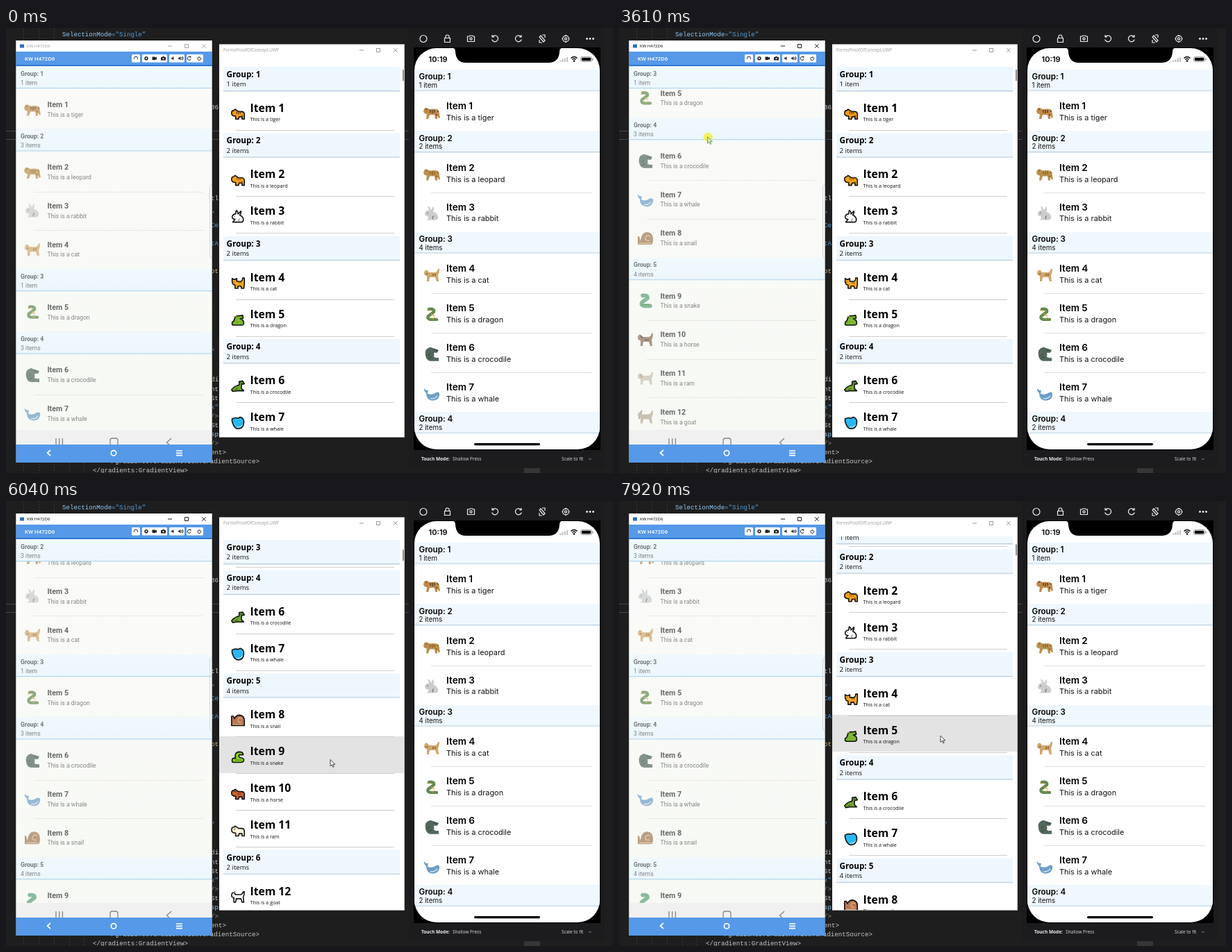
An HTML page that plays this animation: 874x641 px, repeating every 7.99 s.

```html
<!DOCTYPE html>
<html lang="en">
<head>
<meta charset="utf-8">
<title>Grouped lists on three platforms</title>
<style>
  html, body { margin: 0; width: 100%; height: 100%; overflow: hidden; background: #1e1e1e; }
  svg { display: block; width: 874px; height: 641px; }
  text { white-space: pre; }
  .sharp { shape-rendering: crispEdges; }
  .roboto { font-family: Roboto, sans-serif; }
  .open { font-family: "Open Sans", sans-serif; }
  .inter { font-family: Inter, sans-serif; }
  .mono { font-family: "Liberation Mono", monospace; }
</style>
</head>
<body>
<svg id="stage" viewBox="0 0 874 641"></svg>
<script>
const LOOP = 7990;
const DEVICE = 'KW H472D6';
const ANIMALS = ['tiger', 'leopard', 'rabbit', 'cat', 'dragon', 'crocodile', 'whale',
  'snail', 'snake', 'horse', 'ram', 'goat', 'sheep', 'camel', 'llama'];

// ---------- drawing helpers ----------
const rect = (x, y, w, h, fill, more = '') =>
  `<rect x="${x}" y="${y}" width="${w}" height="${h}" fill="${fill}" ${more}/>`;
const line = (d, color, width = 1, more = '') =>
  `<path d="${d}" fill="none" stroke="${color}" stroke-width="${width}" ${more}/>`;
const shape = (d, fill, more = '') => `<path d="${d}" fill="${fill}" ${more}/>`;
const at = (x, y, body, more = '') => `<g transform="translate(${x} ${y})" ${more}>${body}</g>`;
const text = (x, middle, words, size, fill, font, weight = 400) =>
  `<text class="${font}" x="${x}" y="${middle + size * 0.36}" font-size="${size}" fill="${fill}" font-weight="${weight}">${words}</text>`;
const escape = s => s.replace(/</g, '&lt;').replace(/>/g, '&gt;');

// ---------- animals ----------
const PROWLER = 'M-12-2Q-11-8-7-7L-3-5Q3-6 7-5Q11-4 11 2L12 7L10 8L8 4V9H5L4 3H-3L-5 9H-8L-7 2Q-11 2-12-2Z';
const TAIL_UP = 'M-11-3Q-10-9-6-7L-4-4H5Q8-5 9-9L11-9Q11-3 9 0L10 9H7L5 3H-3L-4 9H-7V1Q-11 1-11-3Z';
const CHUNKY = 'M-11-1Q-11-6-7-6L-5-8L-2-6L1-4H6Q11-4 11 1V9H7V5H2L1 9H-4V4Q-11 4-11-1Z';
const STRIPES = 'M-2-4V0M1-4V1M4-4V0M-8-6V-4M8-3L10-2M6 2L8 4';
const COIL = 'M-4-8Q4-9 3-4Q-1-1-5 2Q-7 6-2 7H7';
const FLEECE = 'M-8-5Q-4-6-5-2Q-8-1-7-3';
// soft path, soft colour, vivid path, vivid colour, detail path, detail colour, ribbon width
const ART = {
  tiger: [PROWLER, '#c18a48', CHUNKY, '#f99a1c', STRIPES, '#4b3626'],
  leopard: [PROWLER, '#b98f4c', CHUNKY, '#f8a01f', STRIPES, '#8a5c20'],
  rabbit: ['M-10 0Q-9-5-4-5L-6-11Q-2-10-1-5L2-11Q4-7 2-3Q10 0 9 6Q9 9 5 9H-8Q-4 7-5 4Q-10 4-10 0Z', '#cbcccc',
    'M-10 0Q-9-5-4-5L-3-11Q0-10 0-5L5-10Q6-7 3-3Q10 0 9 6Q9 9 5 9H-9L-5 4Q-10 4-10 0Z', '#fff', 'M-6-2V0M3 3Q0 5 2 8', '#777'],
  cat: [TAIL_UP, '#d0a76b', 'M-10-2V-8L-6-6L-2-8V-3H5Q8-4 8-9H11V2L10 9H6L5 5H0V9H-5V3Q-9 3-10-2Z', '#ffaa22', 'M-8-2H-6M2-2V1M5-2V1', '#7a4d22'],
  dragon: [COIL, '#64894f', 'M-10 8V4Q-6 2-6-2Q-4-8 2-7L8-8L9-3L4-2Q10 0 10 5Q10 9 6 9H-8Z', '#72b82c', 'M-7-6H-2M-1-1L4 2M1 7L4 4', '#c9a146', 4.4],
  crocodile: ['M-9 2Q-11-8-2-10L10-6L8-2L3-2Q4 1 3 4Q6 6 10 5V10H-2Q-8 9-9 2Z', '#53685d',
    'M-11 6Q-8 2-4 0Q0-2 2-2V-8L8-9L11-4L6-3V4L10 8H-2L-9 9Z', '#70a927', 'M2-6L8-5M-6 2L-2-1M-5 6L0 4', '#3c5043'],
  whale: ['M-11-8Q-9-4-5-5L-6 0Q0 3 7-2Q12-3 11 3Q9 10 1 10Q-8 9-8-1Q-12-4-11-8Z', '#6d9ec7',
    'M-10-7Q-5-10 0-8L4-10Q11-8 10 0Q9 10 0 10Q-6 9-8 3Q-11-3-10-7Z', '#28b8f0', 'M-2 7Q5 8 8 3', '#d6e6ef'],
  snail: ['M-11 9V-3H-9L-7 4Q-6-9 3-9Q11-8 11 1Q11 9 8 9Z', '#a17b59', 'M-11 9V-7H-8L-6-3Q-3-9 3-9Q11-8 11 1V9Z', '#b97755', 'M6 3Q-1 4 0-1Q2-6 7-3M-9 7H8', '#e2bb88'],
  snake: [COIL, '#5c9f77', 'M-10 8V4Q-9 1-4 2Q-7-8 2-9Q9-9 9-4H2Q0 0 5 1Q11 2 10 6Q9 9 5 9H-8Z', '#8bd321', 'M-5 5H6', '#3c7a34', 5.6],
  horse: [TAIL_UP, '#8c7058', CHUNKY, '#c9622e', 'M-7-5L-3-3M-1 0H5', '#4b3022'],
  ram: [TAIL_UP, '#c9c2b1', CHUNKY, '#fff4df', FLEECE, '#ad8b59'],
  goat: [TAIL_UP, '#b8ab95', TAIL_UP, '#fff', 'M-7-6L-5-10M-9 0V3', '#756858'],
  sheep: [TAIL_UP, '#cfcabc', CHUNKY, '#fff', FLEECE, '#aaa']
};
ART.camel = ART.horse;
ART.llama = ART.ram;

function animal(name, vivid) {
  const [softPath, soft, vividPath, bright, detail, detailColor, ribbon] = ART[name];
  const round = 'stroke-linejoin="round" stroke-linecap="round"';
  let body;
  if (vivid) body = shape(vividPath, bright, `stroke="#111" stroke-width="1.9" ${round}`);
  else if (ribbon) body = line(softPath, soft, ribbon, round);
  else body = shape(softPath, soft);
  return body + line(detail, detailColor, 1.3);
}

// ---------- grouped lists ----------
const PANELS = {
  android: {
    counts: [1, 3, 1, 3, 4, 2], top: 55, slot: 34.6, row: 55.7, font: 'roboto',
    header: { x: 14, w: 283, h: 31, fill: 'url(#paleHeader)', edge: '#b4d8ee', label: 10.5, sub: 24, textX: 21, sizes: [8.7, 8.7], colors: ['#70777b', '#7d8488'] },
    item: { title: 20.5, sub: 35, textX: 59.5, sizes: [10.7, 8.7], weight: 700, colors: ['#686a68', '#858784'], rule: [40, 284, 55.7, '#e6e8e3'], icon: [38, 28, 1], fade: 0.7 }
  },
  windows: {
    counts: [1, 2, 2, 2, 4, 2, 2], top: 56, slot: 42.4, row: 53, font: 'open', vivid: true,
    header: { x: 313, w: 254, h: 34, fill: '#eff7fe', edge: '#b3c9dc', label: 10.8, sub: 25, textX: 317.5, sizes: [11.7, 9.6], colors: ['#000', '#111'] },
    item: { title: 17, sub: 33.5, textX: 351.5, sizes: [15.7, 7.2], weight: 700, colors: ['#000', '#111'], rule: [331, 559, 48.4, '#cdcdcd'], icon: [334, 25.3, 0.84], fade: 1 }
  },
  phone: {
    counts: [1, 2, 4, 2], top: 60, slot: 31.6, row: 56.9, font: 'inter',
    header: { x: 588, w: 267, h: 29.5, fill: '#eff8fe', edge: '#b9d2e3', label: 10.2, sub: 22.3, textX: 594.5, sizes: [11.6, 9.8], colors: ['#000', '#111'] },
    item: { title: 21, sub: 37.5, textX: 634, sizes: [13.6, 10.9], weight: 600, colors: ['#000', '#111'], rule: [612, 844, 56.9, '#e0e0e0'], icon: [613, 30.5, 1], fade: 1 }
  }
};

function buildList(id) {
  const p = PANELS[id], { header: h, item: m } = p;
  let y = p.top, index = 0, rows = '', headers = '';
  p.tops = [];
  p.rows = [];
  p.counts.forEach((count, group) => {
    p.tops.push(y);
    headers += `<g class="${id}-header" transform="translate(0 ${y})">` +
      rect(h.x, 0, h.w, h.h, h.fill) +
      rect(h.x, h.h, h.w, 1, h.edge) + rect(h.x, h.h + 1, h.w, 1, h.edge, 'opacity=".3"') +
      text(h.textX, h.label, `Group: ${group + 1}`, h.sizes[0], h.colors[0], p.font, m.weight) +
      text(h.textX, h.sub, `${count} item${count > 1 ? 's' : ''}`, h.sizes[1], h.colors[1], p.font) + '</g>';
    y += p.slot;
    for (let i = 0; i < count; i++, y += p.row) {
      const name = ANIMALS[index++];
      const [ix, iy, scale] = m.icon, [x1, x2, ruleY, ruleColor] = m.rule;
      p.rows.push(y);
      rows += at(0, y,
        at(ix, iy, `<g transform="scale(${scale})">${animal(name, p.vivid)}</g>`, `opacity="${m.fade}"`) +
        text(m.textX, m.title, `Item ${index}`, m.sizes[0], m.colors[0], p.font, m.weight) +
        text(m.textX, m.sub, `This is a ${name}`, m.sizes[1], m.colors[1], p.font) +
        rect(x1, ruleY, x2 - x1, 1, ruleColor, 'class="sharp"'));
    }
  });
  return `<g clip-path="url(#${id}Clip)"><g id="${id}-rows">${rows}</g>${headers}</g>`;
}

// ---------- window pieces ----------
const windowButtons = (x, y) => line(
  `M${x - 3} ${y}h6M${x + 21.5} ${y - 2.5}h5v5h-5zM${x + 46} ${y - 2.8}l5.6 5.6m0-5.6l-5.6 5.6`, 'currentColor', 0.9);

function codeBackdrop() {
  const blue = '#569cd6', pale = '#92caf4', grey = '#8a8a8a', tag = '#c8c8c8';
  const code = (x, y, words, color) => text(x, y, escape(words), 9.15, color, 'mono');
  const slivers = [['36', 114, tag], ['tl', 245, tag], ['"', 268, blue], ['Ce', 284, blue], ['tA', 310, blue],
    ['ot', 350, '#d7ba7d'], ['"', 466, blue], ['di', 506, tag], ['nt', 520, tag], ['St', 533, tag], ['k"', 546, blue],
    ['/>', 559, grey], ['St', 572, tag], ['sp', 585, pale], ['/>', 598, grey], ['ent>', 611, tag]];
  return rect(0, 0, 874, 641, '#1e1e1e') +
    line('M25.5 0V641M47.5 0V641M69.5 0V641M91.5 626V641M112.5 626V641', '#383838', 1, 'stroke-dasharray="2 2"') +
    line('M0 148.5H580M0 160.5H580', '#484848') +
    code(81, 9, 'SelectionMode', pale) + code(152, 9, '="Single"', blue) +
    slivers.map(([words, y, color]) => code(295, y, words, color)).join('') +
    code(146, 624, '</gradients:GradientView.GradientSource>', tag) +
    code(125, 637, '</gradients:GradientView>', tag) +
    rect(746, 634, 23, 7, '#363636');
}

function androidWindow() {
  const buttons = [[181, 12], [196, 36], [235, 22], [260, 24]]
    .map(([x, w]) => rect(x, 38, w, 11.5, '#fff', 'rx="1.5"')).join('');
  const icons = line('M184.5 45v-1.5a2.5 2.5 0 0 1 5 0V45M264.8 41.8a2.4 2.4 0 1 0 1.2 2.6M265 40v2h2M277 42a2.4 2.4 0 1 0 2.5 0M278.2 41v2.5M252.5 42q1.5 1.8 0 3.5M254 41q2.5 2.6 0 5', '#222') +
    '<circle cx="202" cy="43.7" r="1.9" fill="none" stroke="#222" stroke-width="1.6"/>' +
    shape('M210.5 41.5h4.5v1.2l2-1.2v4.4l-2-1.2v1.2h-4.5zM223 42h1.5l1-1h2l1 1h1.5v4.5h-7zM238 42.8h1.4l2-1.8v5.4l-2-1.8H238zM248 42.8h1.4l2-1.8v5.4l-2-1.8H248z', '#222') +
    '<circle cx="226.5" cy="44" r="1.1" fill="#fff"/>';
  return rect(14, 18, 283, 608, '#fff') +
    rect(20, 23.5, 6, 5, '#2f6fbd') +
    `<g id="titlebar" color="#999">${text(30, 26, DEVICE, 6, 'currentColor', 'open')}${windowButtons(236, 26)}</g>` +
    rect(14, 34, 283, 21, '#5699e8') + rect(14, 53, 283, 2, '#2e78ce') +
    text(27, 44, DEVICE, 8, '#fff', 'roboto', 500) + buttons + icons +
    rect(14, 55, 283, 524, 'url(#paper)') + buildList('android') +
    line('M297 225Q293.5 226 293.5 230V327Q293.5 331 297 332', '#d2d6d6') +
    rect(14, 579, 283, 21, '#f0f0f0') +
    line('M72 591V602M76.7 591V602M81.4 591V602M152 602Q150 602 150 599V594Q150 591 153 591H158Q161 591 161 594V602M238 591L231.5 597L238 603', '#858585', 1.3) +
    rect(14, 600, 283, 26, '#5599e8') +
    line('M64 608L59.5 612L64 616M245 609H254M245 612.3H254M245 615.6H254', '#fff', 1.7) +
    '<circle cx="155" cy="612.3" r="3.7" fill="none" stroke="#fff" stroke-width="1.7"/>' +
    line('M14.5 18V626M296.5 18V626', '#777', 1, 'opacity=".5"');
}

function windowsWindow() {
  return rect(307, 23.5, 267, 566, '#fff') +
    text(313, 32, 'FormsProofOfConcept.UWP', 6.2, '#999', 'open') +
    `<g color="#8b8b8b">${windowButtons(512, 32)}</g>` +
    rect(307, 0, 267, 53, '#e3e3e3', 'id="hover" class="sharp" clip-path="url(#windowsClip)"') +
    buildList('windows') +
    rect(571, 0, 2, 16, '#8c8c8c', 'id="thumb"') +
    line('M307 23.5H573.5V589.5H307', '#a9a9a9', 0.6);
}

function phoneWindow() {
  const ring = (x, r) => `<circle cx="${x}" cy="15.5" r="${r}" fill="none" stroke="#eee" stroke-width="1.2"/>`;
  const tools = ring(601, 5) + ring(806, 4.4) + ring(806, 1.6) + ring(669.5, 1.6) +
    line('M631.5 14.5h8v6h-8zM633 14.5V12.5a2.5 2.5 0 0 1 5 0V14.5M664.5 12H667L668 11H671.5L672.5 12H674.5V19.5H664.5ZM700.5 12.5a4.5 4.5 0 1 1-.8 4M700 10v3h3M741.5 12.5a4.5 4.5 0 1 0 .8 4M742 10v3h-3M770 11L768 13L774 20L776 18ZM772 10H776V14M768 17V21H772', '#eee', 1.2) +
    [836.5, 841, 845.5].map(x => `<circle cx="${x}" cy="15.5" r="1.4" fill="#eee"/>`).join('') +
    line('M806 10V11.5M806 19.5V21M800.5 15.5H802M810 15.5H811.5', '#eee', 1.5);
  const bars = [0, 1, 2, 3].map(i => rect(797 + i * 3.3, 46.5 - i * 1.5, 2.2, 2.5 + i * 1.5, '#c4c4c4')).join('');
  return rect(580, 0, 282, 634, '#1c1c1e') + tools +
    rect(587, 28, 269, 580, '#000') +
    `<g clip-path="url(#screenClip)">${rect(588, 29, 267, 578, '#fff')}${buildList('phone')}</g>` +
    shape('M642 28Q647 29 647 34Q648 50 662 50H781Q796 50 797 34Q797 29 802 28Z', '#000') +
    text(608.5, 45, '10:19', 11, '#000', 'inter', 600) + bars +
    line('M813.5 43.5Q818 39.5 822.5 43.5M815.3 45.5Q818 43 820.7 45.5', '#000', 1.6) +
    '<circle cx="818" cy="47.5" r="1.3"/>' +
    rect(827.5, 41.5, 16, 7, 'none', 'rx="2" stroke="#888" stroke-width=".8"') +
    rect(828.8, 42.8, 13.4, 4.4, '#000', 'rx="1"') + rect(844.5, 43.8, 1.2, 2.5, '#888') +
    rect(674, 598, 95, 3.2, '#000', 'rx="1.6"') +
    text(598, 621, 'Touch Mode:', 6.5, '#eee', 'open', 700) +
    text(643, 621, 'Shallow Press', 6.5, '#ddd', 'open') +
    text(800, 621, 'Scale to fit', 6.5, '#ddd', 'open') +
    line('M839 620L840.8 621.8L842.6 620', '#aaa', 0.8);
}

const clip = (id, x, y, w, h, rx = 0) => `<clipPath id="${id}">${rect(x, y, w, h, '#000', `rx="${rx}"`)}</clipPath>`;
const gradient = (id, from, to) =>
  `<linearGradient id="${id}" x1="0" y1="0" x2="0" y2="1"><stop stop-color="${from}"/><stop offset="1" stop-color="${to}"/></linearGradient>`;

document.getElementById('stage').innerHTML = '<defs>' +
  clip('androidClip', 14, 55, 283, 524) + clip('windowsClip', 307, 51, 267, 538) +
  clip('phoneClip', 588, 60, 267, 537) + clip('screenClip', 588, 29, 267, 578, 32) +
  gradient('paper', '#fafbf9', '#f7f9f4') + gradient('paleHeader', '#f0f9fd', '#ecf7fd') + '</defs>' +
  codeBackdrop() + androidWindow() + windowsWindow() + phoneWindow() +
  '<g id="cursor"><circle id="spot" cx=".7" cy=".5" r="6.5" fill="#f3ee35"/>' +
  '<path id="arrow" d="M0 0V9.5L2.2 7.4L3.8 10.8L5.2 10.2L3.7 6.9H6.8Z" stroke-width=".9"/></g>';

// ---------- motion ----------
const androidScroll = [[1000, 0], [2130, 295], [2290, 295], [2700, 398], [3300, 398], [3610, 308.5], [4300, 126]];
const windowsScroll = [[5190, 0], [5330, 59], [6040, 348], [6300, 440], [7080, 440], [7180, 400], [7280, 347], [7800, 98], [7920, 82], [7990, 72]];
const pointer = [[110, 800, 630], [340, 150, 440], [510, 150, 440], [1000, 134, 431], [2130, 130, 132], [2290, 130, 132],
  [2700, 130, 33], [3240, 130, 33], [3300, 128, 66], [3610, 127.5, 156.5], [4300, 128, 340], [4950, 440, 420],
  [5330, 450, 413], [6040, 467, 372.5], [7280, 473, 350], [7920, 463, 338]];

function sample(keys, t, column = 1) {
  const next = keys.findIndex(key => key[0] > t);
  if (next === 0) return keys[0][column];
  if (next < 0) return keys[keys.length - 1][column];
  const a = keys[next - 1], b = keys[next];
  return a[column] + (b[column] - a[column]) * (t - a[0]) / (b[0] - a[0]);
}

const $ = id => document.getElementById(id);
const move = (node, x, y) => node.setAttribute('transform', `translate(${x} ${y})`);

// Headers stick to the top until the next one pushes them out.
function scrollList(id, offset) {
  const { tops, top, slot } = PANELS[id];
  move($(`${id}-rows`), 0, -offset);
  document.querySelectorAll(`.${id}-header`).forEach((header, i) => {
    const limit = i + 1 < tops.length ? tops[i + 1] - offset - slot : Infinity;
    move(header, 0, Math.min(Math.max(tops[i] - offset, top), limit));
  });
}

// The highlight trails the pointer slightly.
function placeHover(t, offset) {
  const lift = 5, earlier = t - 90;
  const y = sample(pointer, earlier, 2) + sample(windowsScroll, earlier) + lift;
  const row = t > 5700 ? PANELS.windows.rows.find(top => y >= top && y < top + 53) : undefined;
  $('hover').setAttribute('visibility', row === undefined ? 'hidden' : 'visible');
  if (row !== undefined) $('hover').setAttribute('y', row - lift - offset);
}

function render() {
  const t = performance.now() % LOOP;
  const offset = sample(windowsScroll, t);
  scrollList('android', sample(androidScroll, t));
  scrollList('windows', offset);
  placeHover(t, offset);
  $('thumb').setAttribute('y', 60 + offset * 0.029);
  $('titlebar').setAttribute('color', t < 510 ? '#999' : '#000');

  const x = sample(pointer, t), touching = t > 510 && x < 297;
  move($('cursor'), x, sample(pointer, t, 2));
  $('cursor').setAttribute('visibility', t < 110 ? 'hidden' : 'visible');
  $('spot').setAttribute('opacity', touching ? 0.8 : 0);
  $('arrow').setAttribute('fill', touching ? '#d9efb0' : '#fff');
  $('arrow').setAttribute('stroke', touching ? '#5a9a63' : '#333');
  requestAnimationFrame(render);
}
render();
</script>
</body>
</html>
```
